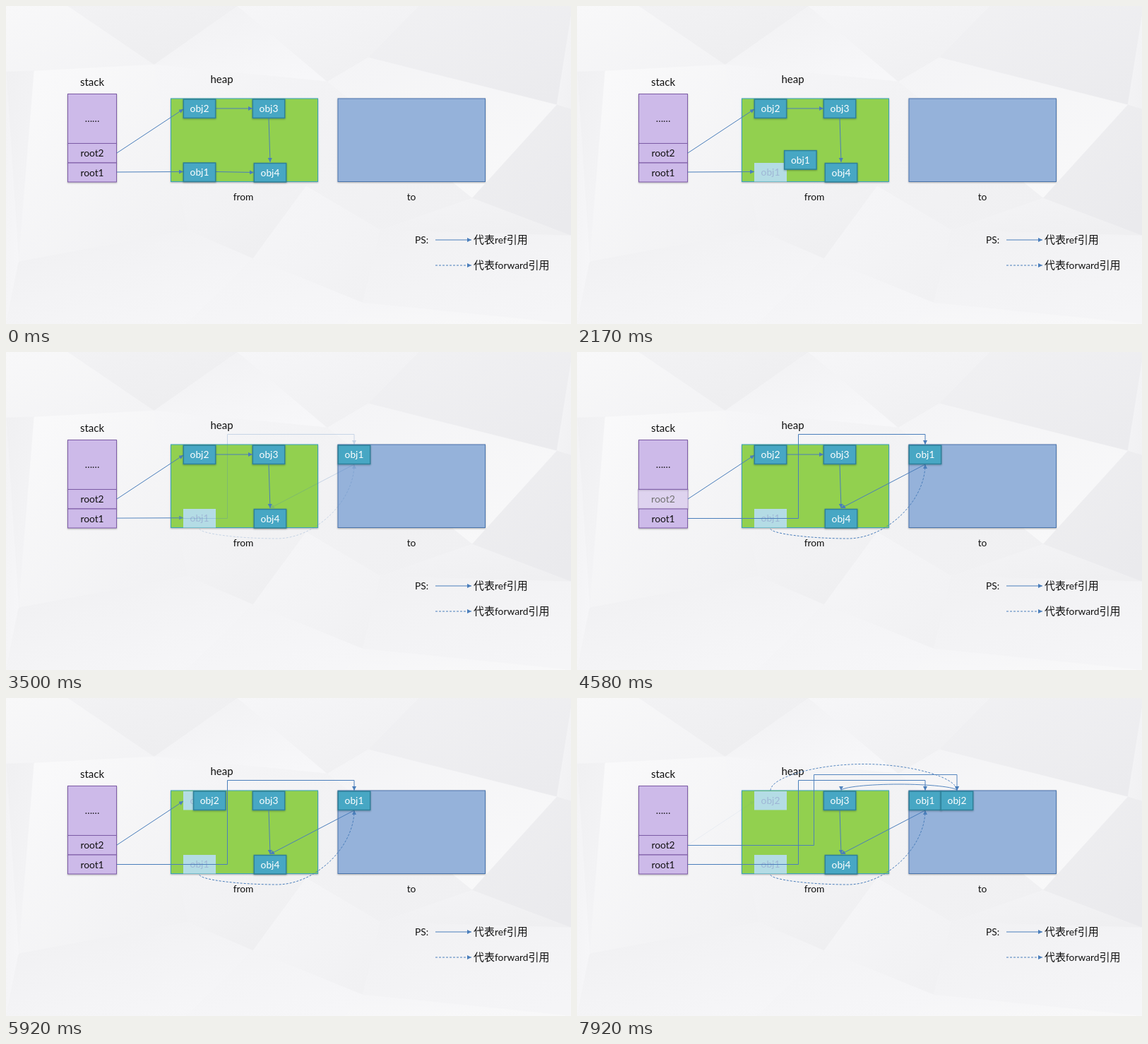
An HTML page that plays this animation: 800x450 px, repeating every 8 s.

```html
<!DOCTYPE html>
<html lang="en">
<head>
<meta charset="utf-8">
<title>Copying collector</title>
<style>
  html, body { margin: 0; width: 100%; height: 100%; overflow: hidden; background: #f3f3f5; }
  svg { display: block; width: 800px; height: 450px; }
  text { font: 13.8px Lato, "Open Sans", sans-serif; fill: #111; text-anchor: middle; }
  .title { font-size: 15px; }
  .left { text-anchor: start; }
  .cjk { font: 300 15px "Noto Sans CJK SC", "Noto Sans CJK", sans-serif; }
  .stack { fill: #cdbae9; stroke: #7d5ba6; }
  .obj rect { fill: #47a7c4; stroke: #2d7f98; stroke-width: 1.5; }
  .obj text { fill: #fff; }
  .ghost rect { fill: #b4dce5; }
  .ghost text { fill: #9fb6d6; }
  .line { fill: none; stroke: #4a7ebb; stroke-width: 1; }
  .dash { stroke-dasharray: 3 2; }
  .pulse { transform-box: fill-box; transform-origin: center; }
</style>
</head>
<body>
<svg id="stage" viewBox="0 0 800 450" xmlns="http://www.w3.org/2000/svg">
  <defs>
    <marker id="head" viewBox="0 0 6 6" refX="6" refY="3" markerWidth="6" markerHeight="6"
      markerUnits="userSpaceOnUse" orient="auto"><path d="M0 0L6 3L0 6Z" fill="#4a7ebb"/></marker>
    <filter id="shade" x="-10%" y="-10%" width="120%" height="130%">
      <feDropShadow dx="0" dy="1" stdDeviation="1" flood-color="#000" flood-opacity=".3"/>
    </filter>
  </defs>
</svg>
<script>
const svg = document.getElementById('stage');

function add(tag, attrs, parent = svg, text) {
  const el = document.createElementNS('http://www.w3.org/2000/svg', tag);
  for (const key in attrs) el.setAttribute(key, attrs[key]);
  if (text) el.textContent = text;
  return parent.appendChild(el);
}
const group = cls => add('g', { class: cls });
const label = (str, x, y, cls = '', parent = svg) => add('text', { x, y, class: cls }, parent, str);
const rect = (x, y, width, height, attrs, parent = svg) =>
  add('rect', { x, y, width, height, ...attrs }, parent);
const arrow = (d, cls = '') => add('path', { d, class: 'line ' + cls, 'marker-end': 'url(#head)' });

// Faceted backdrop: corner points and faces that name them by letter
const corners = {
  a: [0, 0], b: [88, 0], c: [0, 93], d: [210, 83], e: [328, 0], f: [585, 0], g: [800, 15],
  h: [800, 0], i: [455, 107], j: [513, 73], k: [780, 140], l: [800, 146], m: [660, 272],
  n: [530, 317], o: [425, 255], p: [505, 420], q: [350, 357], r: [257, 317], s: [18, 362],
  t: [40, 92], u: [0, 450], v: [800, 450], x: [800, 325], y: [480, 450], z: [255, 450]
};
const faces = [
  'abdc f8f8f9 f3f3f5', 'bed f2f2f4 ededef', 'eid f1f1f3 f7f7f9', 'efji f6f6f8 efeff1',
  'fhgkj f1f1f3 ebebee', 'gkl f5f5f7 f1f1f3', 'jkmi f4f4f6 f8f8f9', 'imno f3f3f5 f0f0f2',
  'dior f6f6f8 f0f0f2', 'cts f0f0f2 f4f4f6', 'tdrs fafafb f1f1f3', 'csu f3f3f5 f6f6f8',
  'srqzu f0f0f2 f6f6f8', 'roq f4f4f6 eeeef0', 'onpq f6f6f8 f1f1f3', 'qpyz f3f3f5 f6f6f8',
  'klxm efeff1 eaeaed', 'mxn f4f4f6 efeff1', 'nxvp f1f1f3 f5f5f7', 'pvy f5f5f7 f8f8f9'
];
faces.forEach((face, n) => {
  const [names, from, to] = face.split(' ');
  const grad = add('linearGradient', { id: 'face' + n, x2: .8, y2: 1 }, svg.querySelector('defs'));
  add('stop', { 'stop-color': '#' + from }, grad);
  add('stop', { offset: 1, 'stop-color': '#' + to }, grad);
  const fill = `url(#face${n})`;
  add('polygon', { points: [...names].map(c => corners[c]).join(' '), fill, stroke: fill, 'stroke-width': .6 });
});

function cell(str, y, height, baseline) {
  const g = group('pulse');
  rect(87.5, y, 69, height, { class: 'stack', filter: 'url(#shade)' }, g);
  label(str, 122, baseline, '', g);
  return g;
}
function obj(str, cx, cy) {
  const g = group('obj');
  rect(cx - 22.7, cy - 13, 45.4, 26.5, { filter: 'url(#shade)' }, g);
  label(str, cx, cy + 5, '', g);
  return g;
}
function ghost(str, cx, cy) {
  const g = group('ghost');
  rect(cx - 23, cy - 13, 46, 26.5, {}, g);
  label(str, cx, cy + 5, '', g);
  return g;
}

label('stack', 122, 113, 'title');
label('heap', 305.5, 109, 'title');
label('from', 336, 275);
label('to', 574, 275);
cell('……', 124.5, 70, 164);
const root2 = cell('root2', 194.5, 27.5, 213);
const root1 = cell('root1', 222, 27, 241);
rect(233.5, 131, 208, 117.5, { fill: '#92d050', stroke: '#38a3b8', filter: 'url(#shade)' });
rect(470, 131, 208.5, 117.5, { fill: '#95b2da', stroke: '#4a74ad', filter: 'url(#shade)' });

label('PS:', 579, 336, 'left');
[['ref', 331, ''], ['forward', 367, 'dash']].forEach(([word, y, cls]) => {
  arrow(`M608 ${y}H659`, cls);
  const line = label('', 662, y + 5, 'left');
  add('tspan', { class: 'cjk' }, line, '代表');
  add('tspan', {}, line, word);
  add('tspan', { class: 'cjk' }, line, '引用');
});

const ghost1 = ghost('obj1', 274, 235), ghost2 = ghost('obj2', 274, 145);
obj('obj3', 372, 145);
obj('obj4', 374, 235.5);
arrow('M372 159L374 221');

const phases = [
  {
    start: 490, root: root1, ghost: ghost1, dx: 219, dy: -90,
    child: arrow('M297 234.5L351 235.5'),
    before: arrow('M157 235L251 234.5'),
    after: [
      arrow('M157 235.5H313.5V116.5H493V131'),
      arrow('M493 159L374 221'),
      arrow('M274 250C274 257 329 264 383.5 264S493 211 493 159', 'dash')
    ]
  },
  {
    start: 4490, root: root2, ghost: ghost2, dx: 264, dy: 0,
    child: arrow('M297 145H349'),
    before: arrow('M157 208L251 146'),
    after: [
      arrow('M157 208.5H335.5V108.5H538V131'),
      arrow('M538 131C538 126 497 122 456 122S374 126 374 131'),
      arrow('M274 131C274 112 340 93.5 406 93.5S538 112 538 131', 'dash')
    ]
  }
];
phases[0].copy = obj('obj1', 274, 235);
phases[1].copy = obj('obj2', 274, 145);

const clamp = v => Math.min(1, Math.max(0, v));
const span = (t, from, length) => clamp((t - from) / length);
const ease = u => u < .5 ? 2 * u * u : 1 - 2 * (1 - u) ** 2;
const show = (el, opacity) => { el.style.opacity = opacity; };

function drawPhase(p, time) {
  const t = time - p.start;
  const beat = span(t, 0, 540);
  show(p.root, 1 - .5 * clamp(Math.min(beat, 1 - beat) * 5));
  p.root.style.transform = `scale(${1 + .05 * (1 - Math.abs(2 * beat - 1))})`;
  show(p.child, 1 - span(t, 560, 520));
  const move = ease(span(t, 1147, 1703));
  show(p.ghost, move > 0 ? 1 : 0);
  p.copy.setAttribute('transform', `translate(${p.dx * move} ${p.dy * move})`);
  const swap = span(t, 2850, 620);
  show(p.before, 1 - swap);
  p.after.forEach(el => show(el, swap));
}

// Twelve poses a second
function frame(now) {
  const time = Math.floor((now % 8000) * .012 + .05) / .012;
  phases.forEach(p => drawPhase(p, time));
  requestAnimationFrame(frame);
}
frame(0);
</script>
</body>
</html>
```
